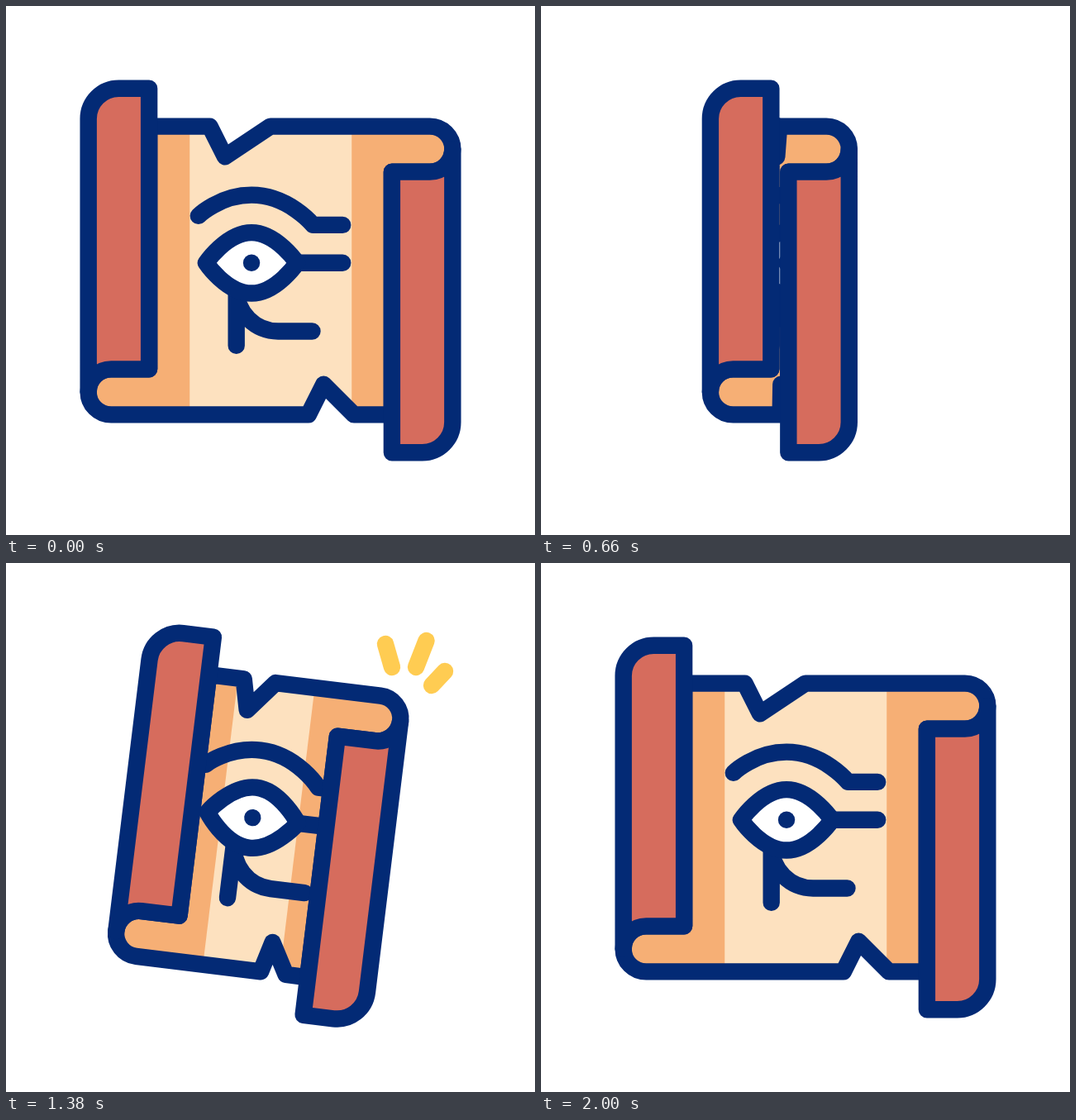
These frames come from a looping animation (640x640 px, 2.4 s). An HTML page with a canvas:

```html
<!DOCTYPE html>
<html lang="en">
<head>
<meta charset="utf-8">
<title>Papyrus scroll</title>
<style>
  html, body { margin: 0; width: 100%; height: 100%; overflow: hidden; background: #fff; }
  canvas { display: block; width: 640px; height: 640px; }
</style>
</head>
<body>
<canvas id="stage"></canvas>
<script>
const LOOP = 2400, STEP = 20;
const UNIT = 9.18, LINE = 20.4 / UNIT;
const NAVY = '#032a75', RED = '#d66c5d', ORANGE = '#f6af75', PALE = '#fde1bf', YELLOW = '#ffcc52';

const canvas = document.getElementById('stage');
const ctx = canvas.getContext('2d');
const dpr = window.devicePixelRatio || 1;
canvas.width = canvas.height = 640 * dpr;

const clamp = x => Math.min(1, Math.max(0, x));
const span = (t, a, b) => clamp((t - a) / (b - a));
const mix = (a, b, k) => a + (b - a) * k;
const smooth = x => x * x * (3 - 2 * x);
const cubic = x => x < 0.5 ? 4 * x ** 3 : 1 - 4 * (1 - x) ** 3;

// [time, degrees]
const SWING = [[800, 0], [1100, -14], [1385, 7], [1610, -4.5], [1815, 2], [2000, 0]];

// [inner x, inner y, outer x, outer y] in pixels
const SPARKS = [[467, 126, 451, 70], [496, 126, 521, 62], [515, 148, 547, 114]];

const roll = new Path2D('M16-13H21A3 3 0 0 0 24-16V20A4 4 0 0 1 20 24H16Z');
const almond = new Path2D('M-8.5-1C-8.5-1-5.8-5-2.5-5S3.5-1 3.5-1S.8 3-2.5 3S-8.5-1-8.5-1Z');
const marks = new Path2D(
  'M-9.5-7.2C-9.5-7.2-6.7-9.95-2.5-9.95C2.4-9.95 5.6-6 5.6-6H9.5' +
  'M3.5-1H9.5M-4.5 2.8V9.9M-4.5 2.5A5.5 5.5 0 0 0 1 8H5.5');

function swing(t) {
  for (let i = 1; i < SWING.length; i++) {
    const [t0, a0] = SWING[i - 1], [t1, a1] = SWING[i];
    if (t < t1) return mix(a0, a1, smooth(span(t, t0, t1)));
  }
  return 0;
}

// 0 is open, 1 is rolled up
function closure(t) {
  return t < 815 ? cubic(span(t, 0, 830)) : 1 - cubic(span(t, 800, 1930));
}

function sheetPath(k, l, r) {
  const notch = (x, end) => mix(x, end, k);
  const p = new Path2D();
  p.moveTo(-16 + l, -19);
  p.lineTo(notch(-8, -3.38), -19);
  p.lineTo(notch(-6, -3.7), -15);
  p.lineTo(notch(0, -3.6), -19);
  p.lineTo(21 + r, -19);
  p.arc(21 + r, -16, 3, -Math.PI / 2, Math.PI / 2);
  p.lineTo(16 + r, -13);
  p.lineTo(16 + r, 19);
  p.lineTo(notch(11, -3.4), 19);
  p.lineTo(notch(7, -3.6), 15);
  p.lineTo(notch(5, -3.6), 19);
  p.lineTo(-21 + l, 19);
  p.arc(-21 + l, 16, 3, Math.PI / 2, Math.PI * 1.5);
  p.lineTo(-16 + l, 13);
  p.closePath();
  return p;
}

function drawSheet(k, l, r) {
  const sheet = sheetPath(k, l, r);
  ctx.save();
  ctx.clip(sheet);
  ctx.fillStyle = PALE;
  ctx.fillRect(-30, -30, 60, 60);
  ctx.fillStyle = ORANGE;
  const left = mix(-10.65, -1.96, k), right = mix(10.7, -4.8, k);
  ctx.fillRect(-30, -30, 30 + left, 60);
  ctx.fillRect(right, -30, 30 - right, 60);
  ctx.restore();
  ctx.stroke(sheet);
}

function drawEye(l, r) {
  ctx.save();
  ctx.beginPath();
  ctx.rect(-24 + l, -30, 48 + r - l, 60);
  ctx.clip();
  ctx.stroke(marks);
  ctx.fillStyle = '#fff';
  ctx.fill(almond);
  ctx.stroke(almond);
  ctx.fillStyle = NAVY;
  ctx.beginPath();
  ctx.arc(-2.5, -1, LINE / 2, 0, Math.PI * 2);
  ctx.fill();
  ctx.restore();
}

function drawRoll(shift, turn) {
  ctx.save();
  ctx.translate(shift, 0);
  ctx.rotate(turn);
  ctx.fillStyle = RED;
  ctx.fill(roll);
  ctx.stroke(roll);
  ctx.restore();
}

function drawSparks(t) {
  const head = smooth(span(t, 1280, 1480));
  const tail = smooth(span(t, 1380, 1600));
  if (head <= tail) return;
  ctx.strokeStyle = YELLOW;
  ctx.lineWidth = 20.4;
  for (const [x0, y0, x1, y1] of SPARKS) {
    ctx.beginPath();
    ctx.moveTo(mix(x0, x1, tail), mix(y0, y1, tail));
    ctx.lineTo(mix(x0, x1, head), mix(y0, y1, head));
    ctx.stroke();
  }
}

function draw(t) {
  const k = closure(t);
  const l = 11.87 * k, r = -18.9 * k;
  ctx.setTransform(dpr, 0, 0, dpr, 0, 0);
  ctx.fillStyle = '#fff';
  ctx.fillRect(0, 0, 640, 640);
  ctx.lineCap = ctx.lineJoin = 'round';
  ctx.save();
  ctx.translate(320, 320);
  ctx.rotate(swing(t) * Math.PI / 180);
  ctx.scale(UNIT, UNIT);
  ctx.strokeStyle = NAVY;
  ctx.lineWidth = LINE;
  drawSheet(k, l, r);
  drawEye(l, r);
  drawRoll(l, Math.PI);
  drawRoll(r, 0);
  ctx.restore();
  drawSparks(t);
}

const start = performance.now();
function tick() {
  const t = (performance.now() - start) % LOOP;
  draw(Math.floor(t / STEP) * STEP);
  requestAnimationFrame(tick);
}
tick();
</script>
</body>
</html>
```
